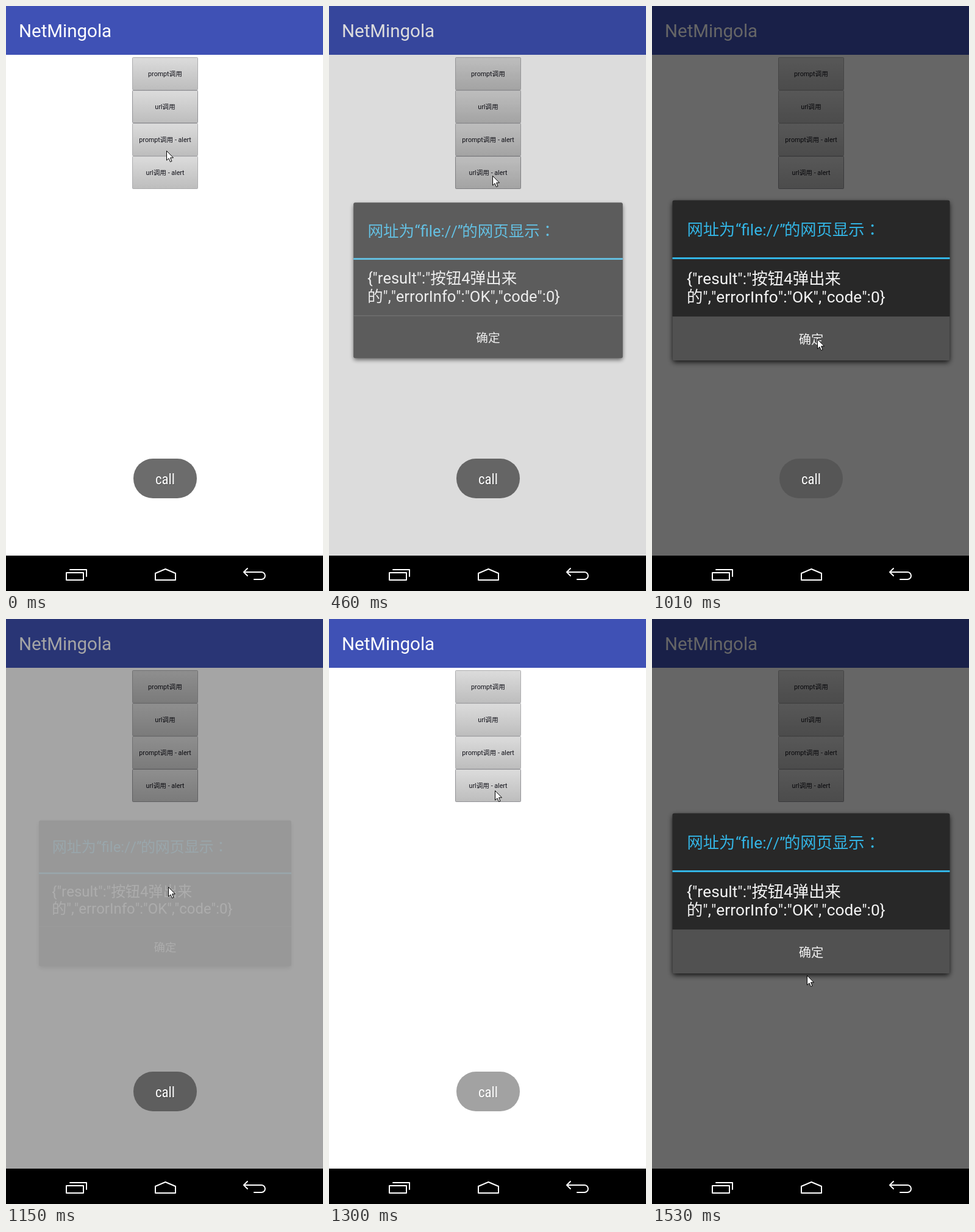
Recreate the animation shown at these times as an HTML page. Size 520 by 959 pixels, loop 1.59 s.

```html
<!DOCTYPE html>
<html lang="zh">
<head>
<meta charset="utf-8">
<title>Alert dialog</title>
<style>
  html, body { margin: 0; width: 100%; height: 100%; overflow: hidden; background: #fff; }
  svg { display: block; width: 100vw; height: 100vh; }
  text { font-family: Roboto, "Noto Sans CJK SC", "Noto Sans CJK", sans-serif; font-kerning: none; white-space: pre; }
  .label { font-size: 10.7px; fill: #101018; text-anchor: middle; }
  .body { font-size: 26.3px; fill: #f3f3f3; }
  .head { font-size: 26.3px; fill: #33b5e5; }
  .colon { font-family: "Noto Sans CJK TC", "Noto Sans CJK JP", sans-serif; }
  .toast { font-family: "Roboto Condensed", Roboto, sans-serif; font-stretch: 75%; font-size: 23px;
    fill: #fff; text-anchor: middle; }
  .nav { fill: none; stroke: #fff; stroke-width: 2; stroke-linejoin: round; stroke-linecap: round; }
</style>
</head>
<body>
<svg viewBox="0 0 520 959" preserveAspectRatio="none">
  <defs>
    <linearGradient id="face" x1="0" y1="0" x2="0" y2="1">
      <stop offset="0" stop-color="#dcdcdc"/>
      <stop offset="1" stop-color="#bdbdbd"/>
    </linearGradient>
    <filter id="blur" x="-10%" y="-10%" width="120%" height="120%">
      <feGaussianBlur stdDeviation="4"/>
    </filter>
  </defs>

  <rect width="520" height="959" fill="#fff"/>
  <rect width="520" height="80" fill="#3f51b5"/>
  <text x="21" y="51" font-size="29.5" fill="#fff">NetMingola</text>
  <g id="buttons"></g>
  <rect id="dim" width="520" height="901"/>

  <g id="dialog">
    <rect x="34" y="322" width="454" height="262" rx="4" opacity=".8" filter="url(#blur)"/>
    <rect x="33.5" y="318.5" width="455" height="262.5" rx="3" fill="#282828"/>
    <rect id="press" x="33.5" y="509" width="455" height="72" rx="2" fill="#515151"/>
    <rect x="33.5" y="412" width="455" height="3" fill="#33b5e5"/>
    <rect x="33.5" y="509" width="455" height="1" fill="#505050"/>
    <text class="head" x="57.5" y="375.5">网址为</text>
    <text class="head" x="137" y="375.5">“file://”</text>
    <text class="head" x="217" y="375.5">的网页显示<tspan class="colon" lang="zh-Hant">：</tspan></text>
    <text class="body" x="57" y="455.5">{"result":"按钮4弹出来</text>
    <text class="body" x="57" y="486">的","errorInfo":"OK","code":0}</text>
    <text x="261" y="554" font-size="20.3" fill="#f3f3f3" text-anchor="middle">确定</text>
  </g>

  <g id="toast">
    <rect x="209" y="742" width="104" height="65" rx="32" fill="#555" fill-opacity=".88"/>
    <text class="toast" x="261.5" y="785" style="fill:#000;opacity:.35">call</text>
    <text class="toast" x="261" y="783.5">call</text>
  </g>

  <rect y="901" width="520" height="58"/>
  <g class="nav">
    <path d="M99 929H127V941H99ZM105 924H132V935"/>
    <path d="M245 941V930L261.5 923L278 930V941Z"/>
    <path d="M396 922L390 928L396 934M390 928H419a6 6 0 0 1 0 12H407"/>
  </g>
  <path id="cursor" d="M.5 .5V16L4 12.8L6.5 18.5L9 17.4L6.6 11.8H11.5Z" fill="#fff" stroke="#000"/>
</svg>
<script>
const LOOP = 1590;
const $ = id => document.getElementById(id);

// The screen refreshes at these times only: [ms, cursor x, cursor y]
const ticks = [
  [0, 263, 237], [70, 266, 266], [150, 268, 278], [300, 268, 278], [380, 268, 278],
  [460, 268, 278], [540, 270, 430], [610, 271, 546], [1010, 271, 546], [1070, 271, 540],
  [1150, 266, 439], [1220, 270, 325], [1300, 272, 281], [1380, 271, 330],
  [1460, 260, 550], [1530, 254, 584]
];

const labels = ['prompt调用', 'url调用', 'prompt调用 - alert', 'url调用 - alert'];
$('buttons').innerHTML = labels.map((label, i) => {
  const y = 84 + i * 54;
  return `<rect x="207.5" y="${y + .5}" width="107" height="53" rx="1" fill="url(#face)"/>` +
    `<text class="label" x="261" y="${y + 31}">${label}</text>`;
}).join('');
const faces = $('buttons').querySelectorAll('rect');

const ramp = (t, start, length) => Math.min(1, Math.max(0, (t - start) / length));
const easeOut = p => 1 - (1 - p) ** 3;
const within = (t, a, b) => t >= a && t < b;

function dialogLevel(t) {
  if (t < 1010) return easeOut(ramp(t, 386, 220));
  if (t < 1300) return 1 - easeOut(ramp(t, 1032, 220));
  return easeOut(ramp(t, 1300, 220));
}

function dimLevel(t) {
  if (t < 1010) return ramp(t, 417, 190);
  if (t < 1300) return 1 - ramp(t, 1068, 200);
  return ramp(t, 1320, 200);
}

function toastLevel(t) {
  return t < 70 ? .98 : 1 - ramp(t, 1220, 210);
}

function render(time) {
  const [t, x, y] = ticks.findLast(tick => tick[0] <= time);
  const shown = dialogLevel(t);
  const focus = t < 150 ? 1 : 3;
  const scale = .9 + .1 * shown;

  faces.forEach((face, i) => face.setAttribute('stroke', i === focus ? '#929296' : '#acacae'));
  $('dim').setAttribute('opacity', .6 * dimLevel(t));
  $('dialog').setAttribute('opacity', shown);
  $('dialog').setAttribute('transform', `translate(261 449.8) scale(${scale}) translate(-261 -449.8)`);
  $('press').setAttribute('opacity', within(t, 1010, 1070) || t >= 1460 ? 1 : 0);
  $('toast').setAttribute('opacity', toastLevel(t));
  $('cursor').setAttribute('transform', `translate(${x} ${y})`);
}

function loop() {
  render(performance.now() % LOOP);
  requestAnimationFrame(loop);
}
loop();
</script>
</body>
</html>
```
